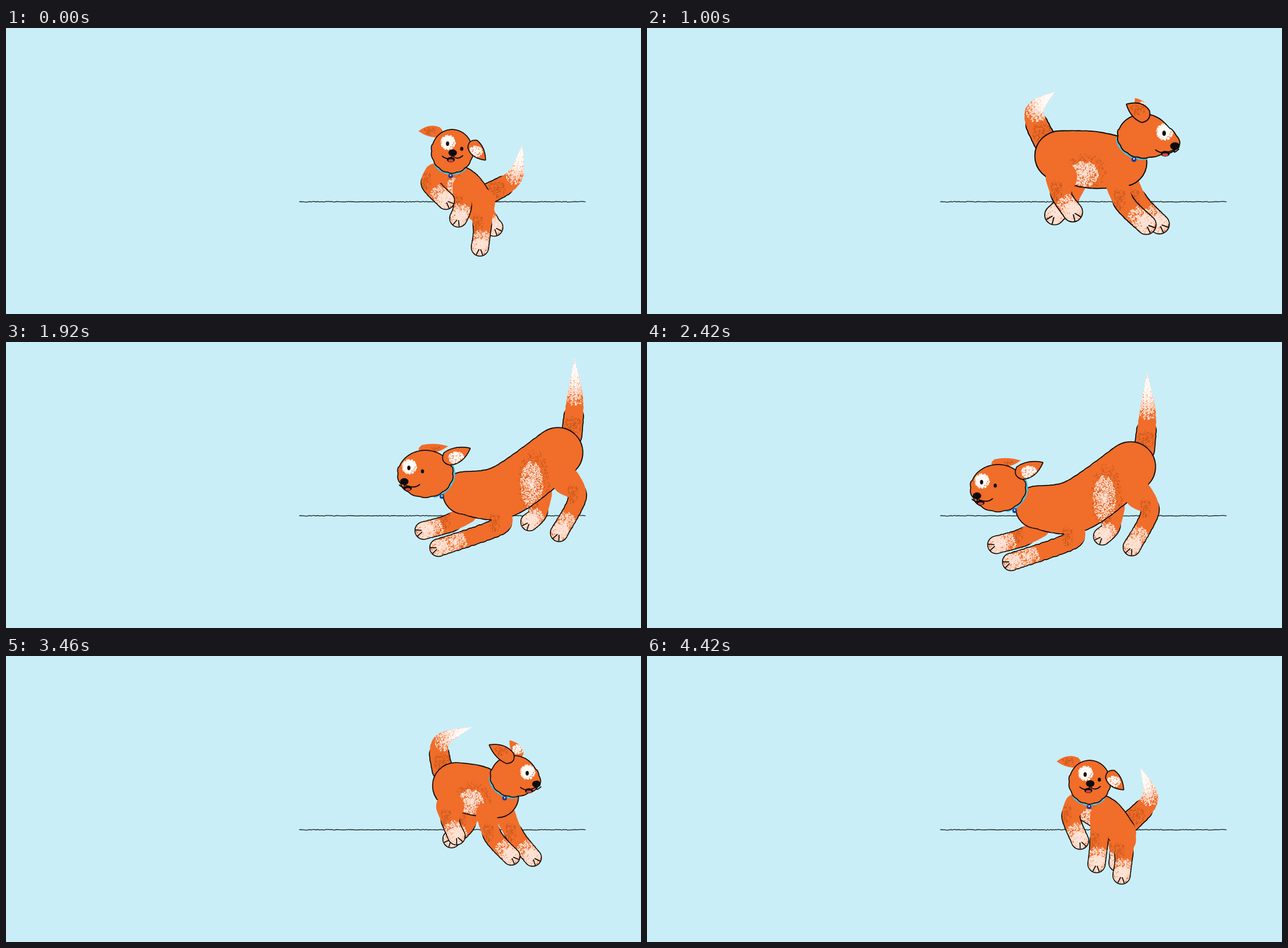
An HTML page with a canvas for the animation above (4.5 s loop, 1116 px wide and 502 px high).

```html
<!DOCTYPE html>
<html lang="en">
<head>
<meta charset="utf-8">
<title>Playful puppy</title>
<style>
html, body { margin: 0; width: 100%; height: 100%; overflow: hidden; background: #c9eef8; }
canvas { display: block; }
</style>
</head>
<body>
<canvas id="stage" width="1116" height="502"></canvas>
<script>
const ctx = document.getElementById('stage').getContext('2d');
const SKY = '#c9eef8', COAT = '#f06d2a', PALE = '#fde3d6', SHADE = '#c9581c', WHITE = '#fffaf6';
const INK = '#0d0b0a', CYAN = '#4cc0e2', NAVY = '#173d92', TONGUE = '#d8473c';
const LOOP = 4500, STEP = 1000 / 12, LEG = 14;

let seed = 7;
const rnd = () => (seed = (seed * 16807) % 2147483647) / 2147483647;
const specks = Array.from({ length: 900 }, () => {
  const a = rnd() * Math.PI * 2, r = rnd() ** 0.7;
  return [Math.cos(a) * r, Math.sin(a) * r, 1 + rnd()];
});

// Skeletons. body: x, y, radius; legs and tail: joints; head: x, y, rx, ry;
// face: patched eye, other eye, nose, relative to the head; ears: base, tip, width.
// L and R are the puppy's own sides; order runs back to front.
const stand = {
  order: 'tail hR body hL fL fR eR head eL',
  body: [[778, 262, 27], [806, 280, 30], [832, 307, 24]], belly: [788, 276, 14, 14],
  tail: [[848, 291], [893, 262], [907, 207]],
  fL: [[803, 278], [802, 315], [795, 334]], fR: [[754, 256], [746, 274], [773, 303]],
  hL: [[835, 305], [837, 350], [833, 385]], hR: [[830, 315], [850, 340], [858, 350]],
  head: [784, 216, 35, 37], face: [[-8, -13], [17, -4], [1, 3]],
  eL: [[820, 204], [842, 231], 12], eR: [[762, 183], [725, 181], 11]
};
const crouch = {
  order: 'tail hR hL body fL fR eL head eR',
  body: [[735, 324, 36], [758, 341, 45], [780, 350, 34]], belly: [762, 377, 24, 12],
  tail: [[720, 296], [734, 262], [779, 233]],
  fL: [[775, 365], [790, 389], [806, 399]], fR: [[726, 358], [734, 385], [744, 401]],
  hL: [[750, 350], [750, 365], [750, 375]], hR: [[724, 350], [712, 378], [716, 391]],
  head: [789, 331, 40, 34], face: [[0, -9], [27, -7], [23, 9]],
  eL: [[822, 306], [844, 321], 9], eR: [[770, 301], [738, 324], 13]
};
const away = {
  order: 'fL fR eR head eL body hL hR tail',
  body: [[833, 296, 32], [878, 293, 49], [892, 276, 37]], belly: [850, 321, 14, 10],
  tail: [[850, 280], [785, 266], [708, 217]],
  fL: [[860, 290], [860, 300], [860, 310]], fR: [[915, 295], [924, 320], [921, 340]],
  hL: [[824, 308], [822, 345], [831, 374]], hR: [[885, 322], [877, 353], [907, 382]],
  head: [881, 233, 35, 24],
  eL: [[850, 217], [886, 199], 11], eR: [[903, 217], [940, 215], 12]
};
const bow = {
  order: 'tail hR fR body hL fL eR head eL',
  body: [[850, 219, 43], [755, 287, 45], [685, 290, 36]], belly: [803, 275, 20, 42],
  tail: [[874, 190], [880, 125], [879, 56]],
  fL: [[745, 322], [747, 348], [640, 386]], fR: [[690, 325], [660, 343], [614, 356]],
  hL: [[864, 268], [884, 298], [852, 360]], hR: [[815, 290], [815, 325], [800, 341]],
  head: [617, 256, 47, 40], face: [[-29, -10], [-5, -4], [-37, 14]],
  eL: [[655, 230], [695, 212], 14], eR: [[612, 213], [657, 208], 9]
};
const dash = {
  order: 'tail hL fL body hR fR eL head eR',
  body: [[749, 238, 39], [802, 246, 42], [856, 254, 36]], belly: [790, 266, 25, 22],
  tail: [[718, 213], [711, 162], [763, 135]],
  fL: [[868, 285], [892, 325], [931, 363]], fR: [[838, 283], [853, 322], [894, 358]],
  hL: [[775, 278], [765, 312], [740, 333]], hR: [[742, 272], [744, 300], [759, 326]],
  head: [897, 213, 40, 35], face: [[32, -4], [49, 16], [49, 16]],
  eL: [[903, 173], [880, 149], 10], eR: [[896, 180], [854, 158], 13]
};
const trot = {
  order: 'tail hR body hL fL fR eR head eL',
  body: [[870, 251, 42], [820, 260, 46], [772, 280, 41]], belly: [821, 278, 14, 25],
  tail: [[886, 212], [905, 174], [963, 151]],
  fL: [[790, 305], [786, 345], [774, 383]], fR: [[748, 315], [746, 365], [733, 396]],
  hL: [[876, 272], [892, 299], [873, 338]], hR: [[848, 295], [843, 318], [830, 342]],
  head: [742, 274, 35, 35], face: [[-16, -9], [8, -10], [-4, 4]],
  eL: [[777, 253], [784, 216], 12], eR: [[708, 252], [706, 224], 11]
};
const pause = {
  ...stand,
  body: [[776, 264, 26], [805, 279, 29], [832, 306, 24]], belly: [776, 281, 16, 14],
  tail: [[848, 292], [884, 250], [868, 198]],
  fL: [[797, 280], [794, 330], [790, 365]], fR: [[753, 260], [745, 283], [761, 324]],
  hL: [[835, 310], [838, 350], [834, 385]], hR: [[835, 322], [829, 350], [827, 363]],
  head: [778, 221, 35, 37],
  eL: [[814, 208], [837, 234], 12], eR: [[757, 187], [720, 185], 11]
};

// Step, skeleton and view: shift x, shift y, scale
const still = [0, 0, 1];
const keys = [
  [0, stand, still], [7, crouch, still], [11, dash, [-40, -20, 1.15]], [17, away, still],
  [23, bow, [120, -25, 1]], [29, bow, still], [33, trot, [-45, -10, 1]], [37, dash, still],
  [40, dash, [25, -15, 1]], [46, trot, still], [53, pause, still], [54, stand, still]
];

const mix = (a, b, q) => Array.isArray(a) ? a.map((v, i) => mix(v, b[i], q)) : a + (b - a) * q;

function blend(a, b, q) {
  const near = q < 0.5 ? a : b, out = { order: near.order.split(' ') };
  for (const name in near) {
    if (name !== 'order') out[name] = mix(a[name] || b[name], b[name] || a[name], q);
  }
  return out;
}

// Drawing helpers
function stroke(path, color, width) {
  ctx.strokeStyle = color;
  ctx.lineWidth = width;
  ctx.stroke(path);
}

function fill(path, color) {
  ctx.fillStyle = color;
  ctx.fill(path);
}

function line(...pts) {
  const path = new Path2D();
  pts.forEach(([x, y], i) => i ? path.lineTo(x, y) : path.moveTo(x, y));
  return path;
}

function oval(color, x, y, rx, ry = rx) {
  const path = new Path2D();
  path.ellipse(x, y, rx, ry, 0, 0, 7);
  fill(path, color);
}

function dust(clip, color, [x, y], rx, ry = rx, density = 1.7) {
  const path = new Path2D(), count = Math.min(specks.length, rx * ry * density);
  for (const [u, v, size] of specks.slice(0, count)) path.rect(x + u * rx, y + v * ry, size, size);
  ctx.save();
  ctx.clip(clip);
  fill(path, color);
  ctx.restore();
}

function spine(joints, perPart = 24) {
  const at = i => joints[Math.max(0, Math.min(joints.length - 1, i))], out = [];
  for (let i = 0; i <= (joints.length - 1) * perPart; i++) {
    const k = Math.min(joints.length - 2, Math.floor(i / perPart)), u = i / perPart - k;
    const [a, b, c, d] = [at(k - 1), at(k), at(k + 1), at(k + 2)];
    out.push(b.map((v, n) => v + 0.5 * u * (c[n] - a[n] + u * (2 * a[n] - 5 * v + 4 * c[n] - d[n]
      + u * (3 * (v - c[n]) + d[n] - a[n])))));
  }
  return out;
}

// A limb is a chain of discs; ink shows only around the discs between from and to
function limb(joints, from, to) {
  const discs = spine(joints), path = new Path2D(), inked = new Path2D();
  discs.forEach(([x, y, r], i) => {
    const radius = Math.max(0.5, r + 0.5 * Math.sin(i * 2.4)), t = i / (discs.length - 1);
    for (const p of t >= from && t <= to ? [path, inked] : [path]) {
      p.moveTo(x + radius, y);
      p.arc(x, y, radius, 0, 7);
    }
  });
  stroke(inked, INK, 3.4);
  fill(path, COAT);
  return path;
}

const withRadii = (joints, radii) => joints.map((p, i) => [...p, radii[i]]);

function drawLeg(joints, hip) {
  const path = limb(withRadii(joints, [hip, LEG * 1.05, LEG]), 0.4, 1);
  const [, [kx, ky], [x, y]] = joints, angle = Math.atan2(y - ky, x - kx);
  dust(path, SHADE, [kx - 9, ky - 8], 10, 18, 0.5);
  dust(path, PALE, mix([x, y], [kx, ky], 0.25), LEG * 1.6, LEG * 1.6, 1.1);
  dust(path, PALE, [x, y], LEG * 1.2, LEG * 1.2, 2.2);
  for (const side of [-0.45, 0.35]) {
    const toe = r => [x + Math.cos(angle + side) * r, y + Math.sin(angle + side) * r];
    stroke(line(toe(LEG * 0.3), toe(LEG)), INK, 1.7);
  }
}

function drawTail(joints) {
  const path = limb(withRadii(joints, [17, 14, 0.5]), 0, 0.3);
  const [base, mid, tip] = joints;
  dust(path, SHADE, mix(base, mid, 0.3), 16, 16, 0.6);
  for (let t = 0.1; t <= 1; t += 0.15) dust(path, t > 0.5 ? WHITE : PALE, mix(mid, tip, t), 18, 18, 0.6 + t);
}

function drawBody(pose) {
  const path = limb(pose.body, 0, 1), [x, y, rx, ry] = pose.belly;
  dust(path, SHADE, [x + 4, y - 4], rx * 1.4, ry * 1.4, 0.3);
  dust(path, PALE, [x, y], rx, ry, 1.4);
}

function drawEar([[bx, by], [tx, ty], width], white, inked) {
  const length = Math.hypot(tx - bx, ty - by), nx = (by - ty) / length * width, ny = (tx - bx) / length * width;
  const at = (t, side) => [bx + (tx - bx) * t + nx * side, by + (ty - by) * t + ny * side];
  const path = new Path2D();
  path.moveTo(...at(0, 0.8));
  path.quadraticCurveTo(...at(0.5, 1.4), tx, ty);
  path.quadraticCurveTo(...at(0.5, -1.1), ...at(0, -0.8));
  path.quadraticCurveTo(...at(-0.3, 0), ...at(0, 0.8));
  if (inked) stroke(path, INK, 3.4);
  fill(path, COAT);
  if (white) dust(path, WHITE, at(0.35, 0.3), width, width * 0.8, 2.4);
  else dust(path, SHADE, at(0.5, 0.2), width, width * 0.7, 0.6);
}

function drawHead({ head: [x, y, rx, ry], face, body }) {
  const neck = body.reduce((a, b) => Math.hypot(a[0] - x, a[1] - y) < Math.hypot(b[0] - x, b[1] - y) ? a : b);
  const toNeck = Math.atan2(neck[1] - y, neck[0] - x);
  const rim = (angle, k) => [x + Math.cos(angle) * rx * k, y + Math.sin(angle) * ry * k];
  const nose = face ? face[2] : [0, 0];
  const toNose = Math.atan2(nose[1], nose[0]);
  const reach = Math.max(0, Math.hypot(nose[0] / rx, nose[1] / ry) - 0.9);

  const collar = new Path2D();
  collar.ellipse(x, y, rx * 1.05, ry * 1.05, 0, toNeck - 0.75, toNeck + 0.75);
  stroke(collar, CYAN, 6);

  const outline = Array.from({ length: 120 }, (_, i) => {
    const a = i / 120 * Math.PI * 2, off = Math.cos(a - toNose) - 1;
    const fluff = Math.sin(a) > -0.3 ? 0.035 * Math.abs(Math.sin(a * 7)) : 0;
    return rim(a, 1 + fluff + reach * Math.exp(off * 9));
  });
  const path = line(...outline);
  path.closePath();
  stroke(path, INK, 3.4);
  fill(path, COAT);
  if (!face) return;

  const [[px, py], [ex, ey], [nx, ny]] = face.map(([u, v]) => [x + u, y + v]);
  dust(path, WHITE, [px, py - 3], 13, 13, 3);
  ctx.save();
  ctx.clip(path);
  oval(WHITE, px, py - 3, 10);
  ctx.restore();
  oval(INK, px, py, 2.8, 4);
  oval(INK, ex, ey, 2.8, 3.6);

  const mx = nx - nose[0] * 0.25;
  oval(INK, mx - 3, ny + 12, 7, 4.5);
  oval(TONGUE, mx - 3, ny + 13.5, 4.5, 2.3);
  const mouth = new Path2D();
  mouth.moveTo(mx - 18, ny + 6);
  mouth.quadraticCurveTo(mx - 7, ny + 15, nx, ny + 5);
  mouth.quadraticCurveTo(mx + 8, ny + 14, mx + 18, ny + 5);
  stroke(mouth, INK, 1.8);
  oval(INK, nx, ny, 7.5, 6);

  const tag = rim((toNeck + Math.PI / 2) / 2, 1.18);
  oval(NAVY, ...tag, 4);
  oval(WHITE, tag[0], tag[1] - 1, 1.3);
}

function drawPuppy(pose) {
  const headAt = pose.order.indexOf('head');
  pose.order.forEach((name, i) => {
    if (name === 'tail') drawTail(pose.tail);
    else if (name === 'body') drawBody(pose);
    else if (name === 'head') drawHead(pose);
    else if (name[0] === 'e') drawEar(pose[name], name === 'eL', i > headAt);
    else drawLeg(pose[name], LEG * (name[0] === 'h' ? 1.75 : 1.3));
  });
}

const ground = line(...Array.from({ length: 252 }, (_, i) => [516 + i * 2, 305 + (rnd() - 0.5) * 1.3]));

function draw(time) {
  const step = Math.floor((time % LOOP + 4.2) / STEP) % 54;
  const next = keys.findIndex(k => k[0] > step);
  const [[t0, from, viewA], [t1, to, viewB]] = [keys[next - 1], keys[next]];
  const q = (step - t0) / (t1 - t0);
  const [dx, dy, scale] = mix(viewA, viewB, q);

  ctx.fillStyle = SKY;
  ctx.fillRect(0, 0, 1116, 502);
  ctx.lineCap = ctx.lineJoin = 'round';
  stroke(ground, '#2a3236', 1.5);
  ctx.save();
  ctx.translate(800 + dx, 300 + dy);
  ctx.scale(scale, scale);
  ctx.translate(-800, -300);
  drawPuppy(blend(from, to, q));
  ctx.restore();
}

const start = performance.now();
function tick() {
  draw(performance.now() - start);
  requestAnimationFrame(tick);
}
tick();
</script>
</body>
</html>
```
